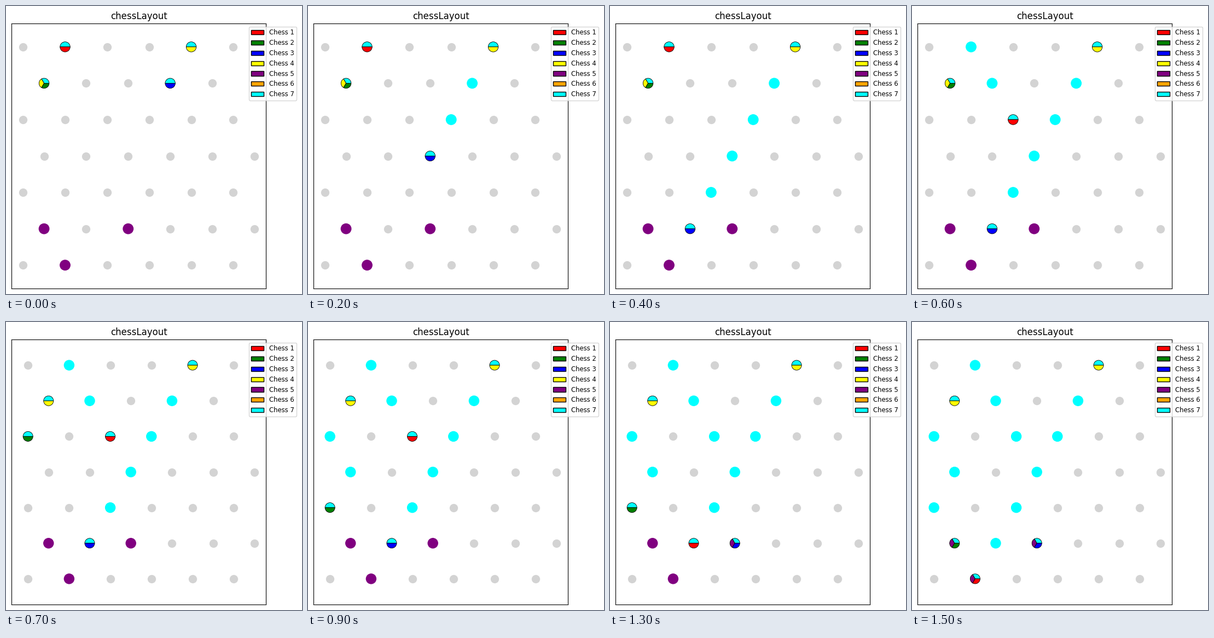
Animation of 541 by 527 pixels, one loop 1.6 s. Source, as a matplotlib script:

```python
import math

import matplotlib.pyplot as plt
from matplotlib.animation import FuncAnimation
from matplotlib.patches import Circle, Patch, Wedge

W, H, DPI = 541, 527, 100
LEFT, BOTTOM, AX_W, AX_H = 10, 10, 465, 485
FRAMES, INTERVAL = 16, 100

COLORS = ["red", "green", "blue", "yellow", "purple", "orange", "cyan"]
RED, GREEN, BLUE, YELLOW, PURPLE, ORANGE, CYAN = range(7)

ROWS, COLS = 7, 6
ROW_STEP = math.sqrt(3) / 2
RADIUS = 0.12

# Cells are (row, column), counted from the top left.
FIXED = {YELLOW: [(0, 4), (1, 0)], PURPLE: [(5, 0), (5, 2), (6, 1)]}
START = {RED: (0, 1), GREEN: (1, 0), BLUE: (1, 3)}
MOVES = [
    (BLUE, (2, 3)), (BLUE, (3, 2)), (BLUE, (4, 2)), (BLUE, (5, 1)),
    (RED, (1, 1)), (RED, (2, 2)),
    (GREEN, (2, 0)), (GREEN, (3, 0)), (GREEN, (4, 0)),
    (BLUE, (5, 2)),
    (RED, (3, 2)), (RED, (4, 2)), (RED, (5, 1)), (RED, (6, 1)),
    (GREEN, (5, 0)),
]


def center(cell):
    row, col = cell
    return col + 0.5 * (row % 2), (ROWS - 1 - row) * ROW_STEP


def board(step):
    """Map each occupied cell to the set of pieces on it."""
    cells = {}

    def put(piece, cell):
        cells.setdefault(cell, set()).add(piece)

    for piece, spots in FIXED.items():
        for cell in spots:
            put(piece, cell)
    place = dict(START)
    trail = list(START.values()) + [(0, 4)]
    for piece, cell in MOVES[:step]:
        place[piece] = cell
        trail.append(cell)
    for piece, cell in place.items():
        put(piece, cell)
    for cell in trail:
        put(CYAN, cell)
    return cells


def fit_view(cells):
    """Five percent margins around the data, with equal scales."""
    low = -RADIUS if any(center(c)[0] == 0 for c in cells) else 0
    high = COLS - 0.5
    pad = 0.05 * (high - low)
    ax.set_xlim(low - pad, high + pad)
    half = (high - low + 2 * pad) * AX_H / AX_W / 2
    mid = (ROWS - 1) * ROW_STEP / 2
    ax.set_ylim(mid - half, mid + half)


def draw(step):
    for patch in list(ax.patches):
        patch.remove()
    cells = board(step)
    fit_view(cells)
    for cell, pieces in cells.items():
        xy = center(cell)
        order = sorted(pieces, reverse=True)
        if len(order) == 1:
            ax.add_patch(Circle(xy, RADIUS, color=COLORS[order[0]]))
            continue
        span = 360 / len(order)
        for i, piece in enumerate(order):
            ax.add_patch(Wedge(xy, RADIUS, i * span, (i + 1) * span,
                               facecolor=COLORS[piece], edgecolor="black",
                               linewidth=0.6))
    return ax.patches


plt.rcParams["font.family"] = "DejaVu Sans"
fig = plt.figure(figsize=(W / DPI, H / DPI), dpi=DPI, facecolor="white")
ax = fig.add_axes([LEFT / W, BOTTOM / H, AX_W / W, AX_H / H])
ax.set_xticks([])
ax.set_yticks([])
ax.set_title("chessLayout", fontsize=12)

points = [center((r, c)) for r in range(ROWS) for c in range(COLS)]
ax.scatter(*zip(*points), s=100, color="lightgrey")

handles = [Patch(facecolor=color, edgecolor="black", label=f"Chess {i}")
           for i, color in enumerate(COLORS, 1)]
ax.legend(handles=handles, fontsize="small", loc="upper left",
          bbox_to_anchor=(0.92, 1))

anim = FuncAnimation(fig, draw, frames=FRAMES, interval=INTERVAL,
                     init_func=lambda: draw(0), repeat=True, repeat_delay=0)
plt.show()
```
